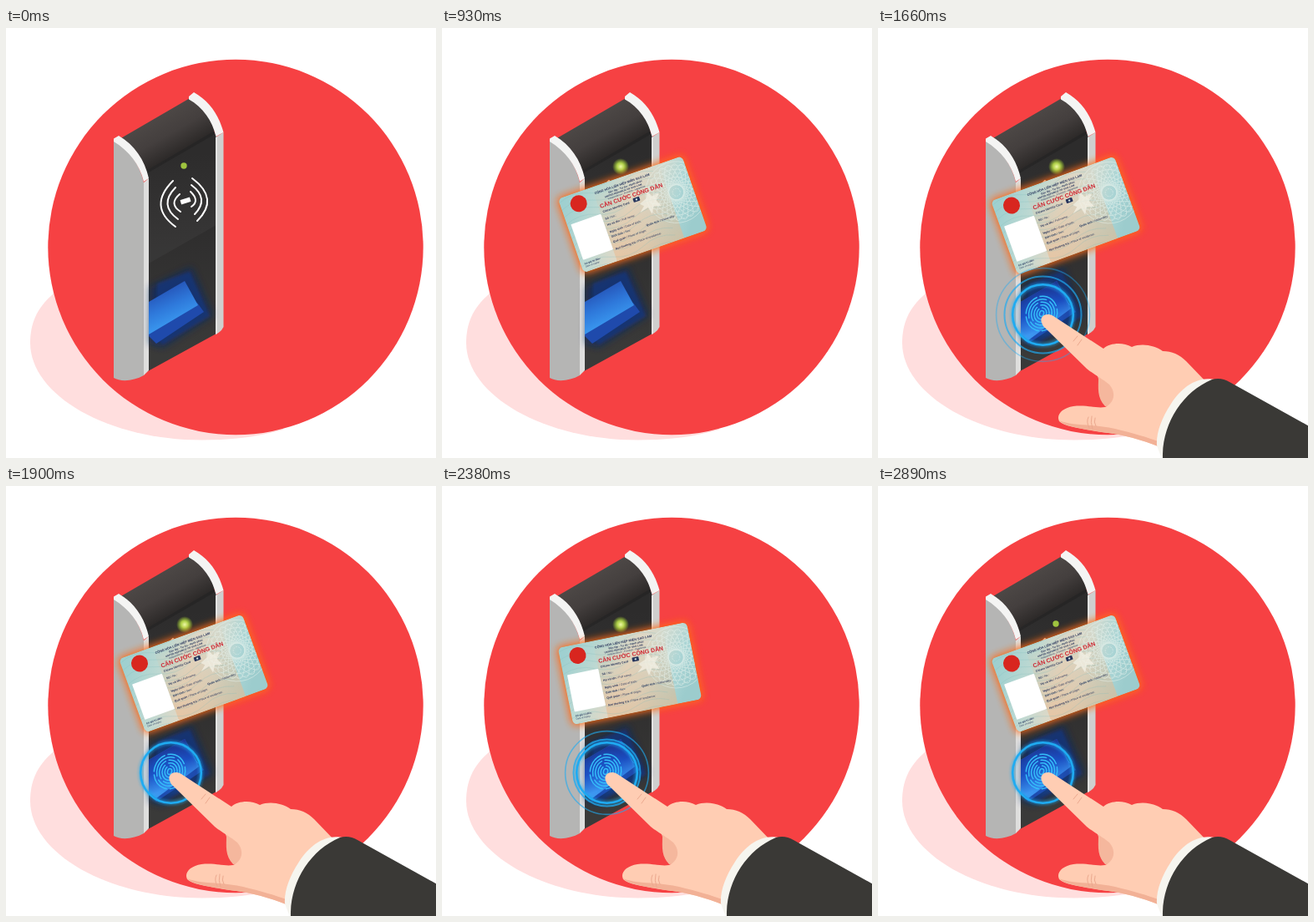
These frames come from a looping animation (515 by 515 pixels, 2920 ms). An HTML page:

```html
<!DOCTYPE html>
<html lang="vi">
<head>
<meta charset="utf-8">
<title>Card and fingerprint reader</title>
<style>
  html, body { margin: 0; width: 100%; height: 100%; overflow: hidden; background: #fff; }
  svg { display: block; width: 100vw; height: 100vh; }
  text { font-family: "Liberation Sans", Arial, sans-serif; }
  .line { fill: none; stroke-linecap: round; }
</style>
</head>
<body>
<svg viewBox="0 0 515 515" xmlns="http://www.w3.org/2000/svg">
  <defs>
    <filter id="soft" x="-50%" y="-50%" width="200%" height="200%"><feGaussianBlur stdDeviation="4"/></filter>
    <filter id="haze" x="-50%" y="-50%" width="200%" height="200%"><feGaussianBlur stdDeviation="1.6"/></filter>
    <linearGradient id="roof" gradientUnits="userSpaceOnUse" x1="178" y1="107" x2="204" y2="152">
      <stop offset="0" stop-color="#4d4846"/><stop offset=".5" stop-color="#443f3e"/><stop offset="1" stop-color="#2b2827"/>
    </linearGradient>
    <linearGradient id="face" gradientUnits="userSpaceOnUse" x1="204" y1="152" x2="215" y2="390">
      <stop offset="0" stop-color="#262525"/><stop offset=".35" stop-color="#2e2d2d"/><stop offset="1" stop-color="#3a3a39"/>
    </linearGradient>
    <linearGradient id="screen" gradientUnits="userSpaceOnUse" x1="192" y1="308" x2="212" y2="352">
      <stop offset="0" stop-color="#2450b4"/><stop offset=".5" stop-color="#2e78da"/><stop offset="1" stop-color="#3b9cf2"/>
    </linearGradient>
    <linearGradient id="active" gradientUnits="userSpaceOnUse" x1="196" y1="306" x2="216" y2="352">
      <stop offset="0" stop-color="#1d2f86"/><stop offset=".55" stop-color="#1c4bbd"/><stop offset="1" stop-color="#3f97f0"/>
    </linearGradient>
    <radialGradient id="lamp">
      <stop offset="0" stop-color="#eef7a6"/><stop offset=".4" stop-color="#b4d34d"/>
      <stop offset=".65" stop-color="#9cc03c" stop-opacity=".7"/><stop offset="1" stop-color="#8fb52c" stop-opacity="0"/>
    </radialGradient>
    <linearGradient id="paper" x1="0" y1=".2" x2="1" y2=".6">
      <stop offset="0" stop-color="#9fd0d0"/><stop offset=".28" stop-color="#bfd9d2"/>
      <stop offset=".5" stop-color="#dfd8c6"/><stop offset=".68" stop-color="#cfdad0"/>
      <stop offset=".85" stop-color="#abd5d5"/><stop offset="1" stop-color="#9ccccd"/>
    </linearGradient>
    <linearGradient id="warm" x1="0" y1="0" x2="0" y2="1">
      <stop offset="0" stop-color="#e9b98e" stop-opacity="0"/><stop offset="1" stop-color="#e9b98e" stop-opacity=".6"/>
    </linearGradient>
    <clipPath id="cardClip"><rect x="-78.5" y="-47" width="157" height="94" rx="5.5"/></clipPath>
  </defs>

  <path fill="#ffdede" d="M57 318C36 336 29 355 29 377C29 440 122 493.5 235 493.5C270 493.5 300 490 332 481L275 262Z"/>
  <circle cx="275" cy="262.500" r="224.700" fill="#f64143"/>

  <g id="reader">
    <path fill="url(#face)" d="M160 165L246 115L252 130V366L170 411V180Z"/>
    <path fill="url(#roof)" d="M136 133L222 83C238 92 246 105 250 123L168 171C163 155 152 143 136 133Z"/>
    <path fill="#fff" opacity=".03" d="M169 174L252 126V236L171 282Z"/>
    <path fill="#b5b5b4" d="M129 133C147 145 160 163 165 185V416C153 423 137 424 129 419Z"/>
    <path fill="#dededd" d="M165 185L171 180V410L165 416Z"/>
    <path fill="#f4f4f3" d="M129 132.500L135 129C154 140 166 158 171 180L165 184C160 163 147 147 129 136Z"/>
    <path fill="#cfcfce" d="M251 131L260.500 125V358Q258 364 251 367Z"/>
    <path fill="#f4f4f3" d="M219 82L225 77C243 87 255 104 260.500 125L251.500 130C247 111 236 95 219 85.500Z"/>
    <path fill="#e4e4e3" d="M251 131L253 130V366L251 367Z"/>

    <path fill="#0d2a66" opacity=".75" filter="url(#soft)" d="M173 310L222 287L247 344L188 382L172 378Z"/>
    <path fill="#17397f" opacity=".65" d="M181 306L220 292L244 345L188 379L181 372Z" filter="url(#haze)"/>
    <path fill="#1f4aac" d="M171 363L229 329L237 340L180 378L171 369Z"/>
    <path fill="url(#screen)" d="M171 328L214 303L230 332L171 367Z"/>
    <g id="waves" class="line" stroke="#fff" stroke-width="2"></g>
    <rect x="-6" y="-2.800" width="12" height="5.600" rx=".6" fill="#fff" transform="translate(215 207) rotate(-18)"/>
    <circle cx="213" cy="165" r="3.700" fill="#9fc43f"/>
    <circle id="glow" cx="214" cy="166" r="10" fill="url(#lamp)"/>
  </g>

  <g id="touch">
    <path fill="url(#active)" d="M171 328L214 303L231 336L180 374L171 367Z"/>
    <circle cx="196" cy="343" r="24" fill="#1273ea" opacity=".25" filter="url(#soft)"/>
    <g id="print" class="line" stroke="#35bdf8" stroke-width="1.500" transform="translate(196 342) rotate(18)"></g>
  </g>

  <g id="card">
    <rect x="-81" y="-49" width="162" height="98" rx="8" fill="#ff6a18" opacity=".9" filter="url(#soft)"/>
    <g clip-path="url(#cardClip)">
      <rect x="-79" y="-47" width="158" height="94" fill="url(#paper)"/>
      <rect x="-36" y="-47" width="85" height="94" fill="url(#warm)"/>
      <g id="rosette" fill="none" stroke="#e9f4ee" stroke-width=".7" opacity=".65"></g>
      <path fill="#f3f1e4" opacity=".75" d="M12-9L22-13L25-21L29-13L38-14L32-7L36 2L27-1L22 7L20-2L9 1L16-5Z"/>
      <rect x="-74" y="-13" width="38" height="45" rx="1" fill="#fff"/>
    </g>
    <circle cx="-57" cy="-33.500" r="10" fill="#d8261f"/>
    <g id="words"></g>
    <rect x="6" y="-18" width="8" height="5" rx=".8" fill="#26345c"/>
    <circle cx="10" cy="-15.500" r="1.200" fill="#c9dcd6"/>
  </g>

  <g id="rings" fill="none" stroke="#1fabf2">
    <circle cx="197.500" cy="343.500" r="36" stroke-width="6" opacity=".45" filter="url(#haze)"/>
    <circle cx="197.500" cy="343.500" r="36.300" stroke-width="2.600"/>
    <circle id="wave" cx="197.500" cy="343.500" stroke-width="1.600"/>
    <circle id="echo" cx="197.500" cy="343.500" stroke-width="2"/>
  </g>

  <g id="hand">
    <path fill="#f5b79d" d="M258 404L285 420L290 452L272 453C262 443 264 430 264 420Z"/>
    <path fill="#ffcdb3" d="M196 353C193 345 202 340 210 345L270 384C278 377 293 376 304 382C316 377 331 380 341 387C352 387 361 391 369 399L394 425L338 502C315 493 295 487 268 484C246 480 224 478 217 471C213 463 221 455 234 453C250 451 262 456 272 454C284 448 285 436 277 427C267 419 260 416 250 408L201 360Q197 357 196 353Z"/>
    <path fill="#f2b196" d="M217 470C232 477 260 474 284 480C305 485 322 490 338 496V502C315 493 295 487 268 484C246 480 224 478 217 470Z"/>
    <path class="line" stroke="#eba98f" stroke-width="1" d="M252 466Q249 472 253 479M256 465Q254 472 257 480M260 467Q258 472 261 477M234 375L239 369M239 380L244 373"/>
    <path fill="#f6f5ef" d="M400 420.500C381 418 363 431 351 450C339 468 333 486 334 500Q337 510 343 520H372L420 424Z"/>
    <path fill="#3a3936" d="M400 421Q411 418 421 424L720 590V720H380L341 515C340 475 364 436 400 421Z"/>
  </g>
</svg>
<script>
const $ = id => document.getElementById(id);
const NS = "http://www.w3.org/2000/svg";
const LOOP = 2920;

function add(parent, tag, attrs, text) {
  const el = document.createElementNS(NS, tag);
  for (const k in attrs) el.setAttribute(k, attrs[k]);
  if (text) el.textContent = text;
  parent.appendChild(el);
  return el;
}

// Curve from a to c passing through b
function arc([ax, ay, bx, by, cx, cy]) {
  add($("waves"), "path", { d: `M${ax} ${ay}Q${2 * bx - (ax + cx) / 2} ${2 * by - (ay + cy) / 2} ${cx} ${cy}` });
}
[
  [200, 183, 185.5, 212, 203, 238], [203, 191, 193.5, 211, 206, 229], [208, 199, 201.5, 210, 209, 220],
  [223, 180, 241, 205, 229, 231], [222, 188, 234, 205, 226, 223], [221, 196, 227, 206, 222, 214]
].forEach(arc);

for (let i = 0; i < 6; i++) {
  add($("print"), "ellipse", {
    rx: 2.5 + i * 3.2, ry: 3.5 + i * 3.5,
    "stroke-dasharray": i % 2 ? "24 4" : "36 5"
  });
}

for (let i = 1; i < 9; i++) {
  add($("rosette"), "circle", { cx: 58, cy: -8, r: i * 4.6, "stroke-dasharray": i % 2 ? "2 1" : "none" });
}
for (let i = 0; i < 12; i++) {
  add($("rosette"), "ellipse", { cx: 58, cy: -8, rx: 34, ry: 9, transform: `rotate(${i * 15} 58 -8)` });
  add($("rosette"), "path", { d: `M-80 ${i * 9 - 50}q20 -9 40 0t40 0t40 0`, stroke: "#7fbcbc", opacity: 0.5 });
}

// x, baseline, size, bold text, plain text
const navy = "#26345c", red = "#cf2430";
[
  [-35, -37.5, 3.8, "CỘNG HÒA LIÊN HIỆP MIỀN SAO LAM"],
  [-19, -33.3, 3.2, "Độc lập - Tự do - Hạnh phúc"],
  [-25, -29.6, 3, "UNITED REPUBLIC OF SAO LAM"],
  [-22, -26.3, 2.8, "", "Independence - Freedom - Happiness"],
  [-34, -19.5, 7, "CĂN CƯỚC CÔNG DÂN"],
  [-33, -13.5, 3.5, "Citizen Identity Card"],
  [-33, -4.5, 3.5, "Số", " / No.:"],
  [-33, 3, 3.5, "Họ và tên", " / Full name:"],
  [-33, 12, 3.5, "Ngày sinh", " / Date of birth:"],
  [-33, 18, 3.5, "Giới tính", " / Sex:"],
  [11, 19, 3.5, "Quốc tịch", " / Nationality:"],
  [-33, 24.5, 3.5, "Quê quán", " / Place of origin:"],
  [-33, 33.5, 3.5, "Nơi thường trú", " / Place of residence:"],
  [-74, 38, 3, "Có giá trị đến:"],
  [-74, 41.5, 2.8, "", "Date of expiry:"]
].forEach(([x, y, size, bold, plain]) => {
  const line = add($("words"), "text", { x, y, "font-size": size, fill: size > 5 ? red : navy, "xml:space": "preserve" });
  if (bold) add(line, "tspan", { "font-weight": 700 }, bold);
  if (plain) add(line, "tspan", {}, plain);
});

const clamp = v => Math.max(0, Math.min(1, v));
const ease = v => { v = clamp(v); return v * v * (3 - 2 * v); };

// Steps of [tick, value], linear in between
function track(steps, n) {
  let i = 1;
  while (i < steps.length - 1 && n > steps[i][0]) i++;
  const [a, va] = steps[i - 1], [b, vb] = steps[i];
  return va + (vb - va) * clamp((n - a) / (b - a));
}

const travel = [[1, 0], [2, 0.03], [3, 0.1], [4, 0.24], [5, 0.484], [6, 0.75], [7, 0.87], [8, 0.94], [9, 0.98], [10, 1]];
const rise = [[1, 156], [5, 200], [6, 212], [8, 222], [10, 224.5]];
const tilt = [[1, -7], [5, -13.5], [6, -16.5], [10, -20]];
const show = (id, opacity) => $(id).setAttribute("opacity", opacity);

// Ring that grows and fades with age
function ripple(id, age) {
  $(id).setAttribute("r", 37 + 3 * Math.max(0, age));
  show(id, age < 0 ? 0 : track([[0, 0.8], [4, 0.65], [6, 0.45], [11, 0]], age));
}

function draw(ms) {
  // The first ten ticks last 100 ms, the others 30 ms
  const n = Math.floor(ms < 1000 ? ms / 100 : 10 + (ms - 1000) / 30);
  const phase = n % 26;

  show("glow", track([[0, 0], [4, 1], [16, 1], [21, 0]], phase));

  const swing = n > 52 && n < 71 ? 14 * Math.sin(Math.PI * (n - 52) / 19) : 0;
  const x = 400 - 175 * track(travel, n);
  $("card").setAttribute("transform", `translate(${x} ${track(rise, n)}) rotate(${track(tilt, n) + swing})`);
  show("card", track([[0, 0], [3, 1]], n));

  const away = 1 - ease((n - 17) / 9);
  $("hand").setAttribute("transform", `translate(${330 * away} ${190 * away})`);
  show("hand", n < 18 ? 0 : 1);

  const contact = clamp((n - 24) / 3);
  show("touch", contact);
  show("rings", contact);
  ripple("wave", phase + 0.3);
  ripple("echo", phase - 3);
}

function loop() {
  draw(performance.now() % LOOP);
  requestAnimationFrame(loop);
}
loop();
</script>
</body>
</html>
```
